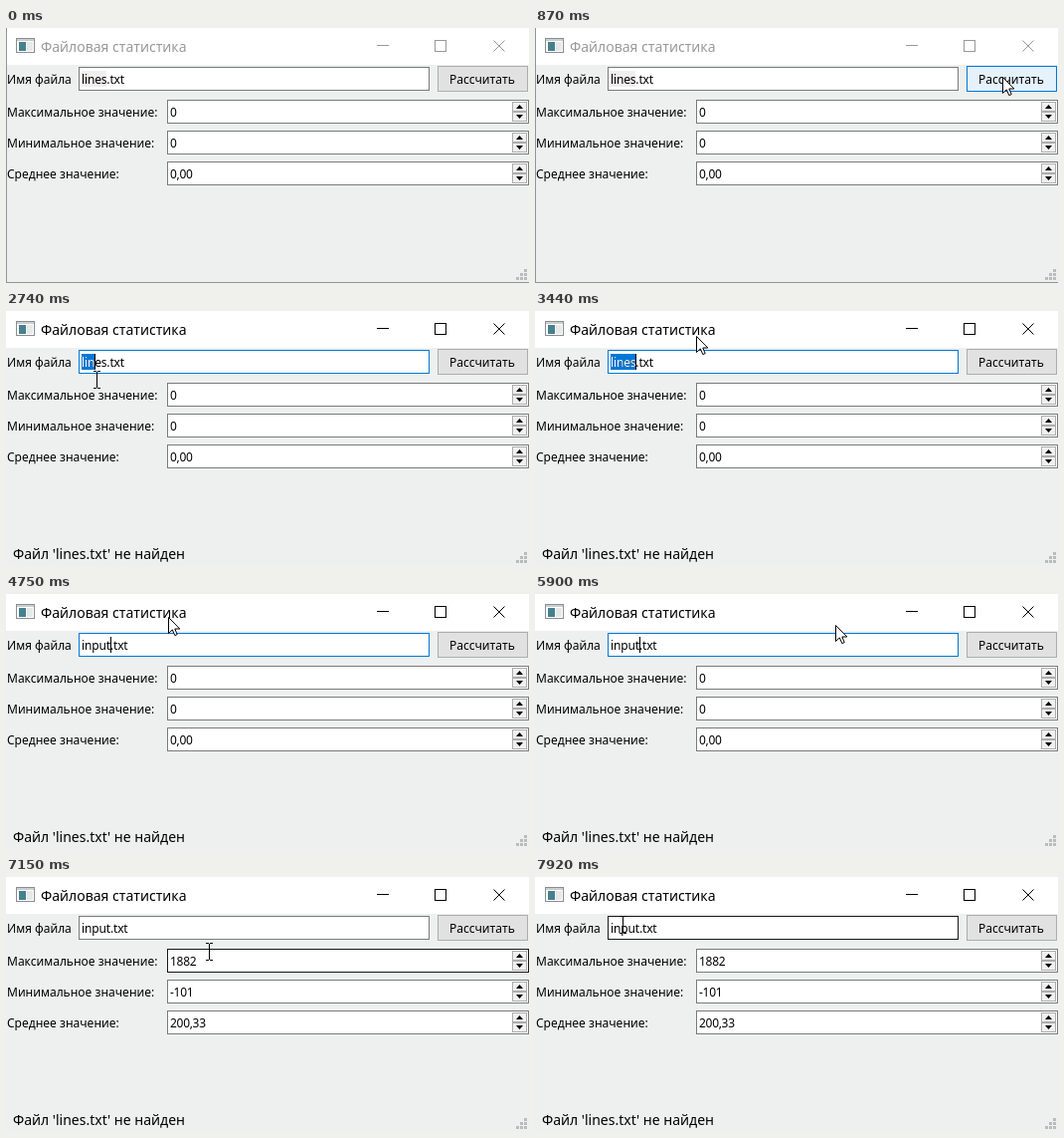
Recreate the animation shown at these times as an HTML page. Size 526 by 256 pixels, loop 8 s.

```html
<!DOCTYPE html>
<html lang="ru">
<head>
<meta charset="utf-8">
<title>Файловая статистика</title>
<style>
html, body { margin: 0; width: 100%; height: 100%; overflow: hidden; background: #eef0f0; }
svg { display: block; width: 526px; height: 256px; font: 12px "Noto Sans", "Open Sans", sans-serif; }
rect, .crisp { shape-rendering: crispEdges; }
text { white-space: pre; }
.big { font-size: 14px; }
.num { letter-spacing: -.3px; }
.name { letter-spacing: -.15px; }
</style>
</head>
<body>
<svg id="stage" viewBox="0 0 526 256"></svg>
<script>
const LOOP = 8000;
const stage = document.getElementById('stage');

function add(tag, attrs, text) {
  const el = document.createElementNS('http://www.w3.org/2000/svg', tag);
  set(el, attrs);
  if (text) el.textContent = text;
  return stage.appendChild(el);
}
function set(el, attrs) {
  for (const key in attrs) el.setAttribute(key, attrs[key]);
}
const show = (el, on) => set(el, { visibility: on ? 'visible' : 'hidden' });
const fill = (x, y, width, height, color) => add('rect', { x, y, width, height, fill: color });
const label = (x, y, text, cls = '') => add('text', { x, y, class: cls }, text);
const line = (d, stroke = '#000') => add('path', { d, stroke, fill: 'none', class: 'crisp' });

// Bordered box that knows whether a point is over it
function box(x, y, w, h, color = '#fff', stroke = '#7a7a7a') {
  const el = add('rect', { x: x + .5, y: y + .5, width: w - 1, height: h - 1, fill: color, stroke });
  const over = ([px, py]) => px >= x && px < x + w && py >= y && py < y + h;
  return { el, over };
}

// Window
fill(0, 0, 526, 256, '#eef0f0');
fill(0, 0, 526, 37, '#fff');
const edge = line('M.5 0V255.5H526', '#8f9599');

box(10, 10, 19, 15, '#fff', '#8b8f92');
fill(11, 11, 17, 2, '#c9cdd0');
fill(13, 14, 7, 9, '#47808f');
fill(21, 14, 6, 9, '#e6e9ea');

const title = label(35, 24, 'Файловая статистика', 'big');
const controls = [
  line('M373 17.5H385'),
  line('M431.5 12.5H442.5V23.5H431.5Z'),
  add('path', { d: 'M490.5 12.5L501.5 23.5M501.5 12.5L490.5 23.5' })
];

// File name row
const NAME_X = 76;
label(1, 56, 'Имя файла');
const edit = box(73, 39, 353, 24);
const selection = fill(NAME_X, 43, 0, 16, '#0078d7');
const name = label(NAME_X, 56, '', 'name');
const picked = label(NAME_X, 56, '', 'name');
set(picked, { fill: '#fff' });
const caret = fill(NAME_X, 43, 1, 16, '#000');
const button = box(434, 38, 91, 26, '#e1e1e1', '#adadad');
label(446, 56, 'Рассчитать');

// Result rows
const rows = [
  ['Максимальное значение:', '0', '1882'],
  ['Минимальное значение:', '0', '-101'],
  ['Среднее значение:', '0,00', '200,33']
].map(([text, before, after], i) => {
  const y = 72 + 31 * i;
  label(1, y + 17, text);
  const field = box(162, y, 364, 24);
  const value = label(165, y + 17, before, 'num');
  for (const dir of [-1, 1]) {
    const mid = y + 12 + 5 * dir;
    box(509, mid - 5, 15, 10, '#f0f0f0', '#adadad');
    add('path', { d: `M513 ${mid - 2 * dir}h7l-3.5 ${4 * dir}z` });
  }
  return { field, value, before, after };
});

const status = label(7, 249, "Файл 'lines.txt' не найден", 'big');
for (let r = 0; r < 3; r++)
  for (let c = 2 - r; c < 3; c++) fill(513 + 4 * c, 242 + 4 * r, 3, 3, '#b9bcbd');

// Pointers
const arrow = add('path', {
  d: 'M.5 .5V16.5L4.3 12.9L6.8 18.6L9.2 17.6L6.8 12H11.8Z', fill: '#fff', stroke: '#000'
});
const beam = line('M-3 -8.5H0M1 -8.5H4M.5 -8V8M-3 8.5H0M1 8.5H4');

// Each move glides on from where the last one stopped
const moves = [];
let at = { x: 430, y: 163 };
function glide(start, end, x, y, bow = 0) {
  moves.push({ start, end, from: at, to: { x, y }, bow });
  at = { x, y };
}
glide(100, 730, 470, 49);          // to the button
glide(1500, 1880, 111, 47);        // to the file name
glide(1970, 2440, 78, 58);
glide(2590, 2960, 104, 80);        // select the name
glide(3040, 3360, 162, 25);        // out of the way
glide(3440, 4980, 163.4, 22.8);    // slow drift while typing
glide(5440, 5520, 193, 20);
glide(5760, 6200, 470, 48);        // to the button
glide(6360, 6510, 466, 42);
glide(6610, 7530, 75, 47, 34);     // back to the file name
glide(7860, 7920, 88, 48);

const STEP = 75;
function pointer(t) {
  const { start, end, from, to, bow } = moves.filter(m => m.start <= t).pop() || moves[0];
  const step = time => Math.floor((time - start) / STEP + .2) + 1;
  const p = Math.max(0, Math.min(1, step(t) / step(end)));
  const u = p * p * (3 - 2 * p);
  const mix = (a, b) => a + (b - a) * u;
  return [mix(from.x, to.x), mix(from.y, to.y) + bow * Math.sin(Math.PI * u)].map(Math.round);
}

const within = (t, [a, b]) => t >= a && t < b;
const CLICKS = [[950, 1110], [6250, 6400]];
const DRAG = [2590, 3000];
const KEYS = [3820, 3900, 4450, 4520, 4670];
const BLINK = 530;

const nameWidth = n => n ? Math.round(name.getSubStringLength(0, n)) : 0;

function drawName(t, active, focus, dragging, x) {
  const typed = KEYS.filter(k => k <= t).length;
  const word = typed ? 'input'.slice(0, typed) : 'lines';
  name.textContent = word + '.txt';

  let count = 0;
  if (dragging) while (count < 5 && nameWidth(count + 1) <= x - NAME_X) count++;
  else if (!typed && (!active || t >= DRAG[1])) count = 5;

  set(selection, { width: nameWidth(count), fill: active ? '#0078d7' : '#f0efee' });
  picked.textContent = active ? word.slice(0, count) : '';
  set(caret, { x: NAME_X + nameWidth(dragging ? count : word.length) });
  const idle = t - KEYS[4] - 100;
  show(caret, focus && (idle < 0 || Math.floor(idle / BLINK) % 2 === 0));
}

function draw(t) {
  const pos = pointer(t);
  const [[press], [press2, release2]] = CLICKS;
  const visible = t >= 100;
  const active = t >= press;
  const focus = within(t, [DRAG[0], press2]);
  const dragging = within(t, DRAG);
  const over = b => visible && b.over(pos);

  const ink = active ? '#000' : '#999';
  set(title, { fill: ink });
  controls.forEach(c => set(c, { stroke: ink }));
  show(edge, !active);
  show(status, t >= CLICKS[0][1]);

  drawName(t, active, focus, dragging, pos[0]);
  set(edit.el, { stroke: focus ? '#0078d7' : over(edit) ? '#171717' : '#7a7a7a' });

  // Button colours: pressed, easing back, hovered, plain
  const look =
    CLICKS.some(c => within(t, c)) ? ['#cce4f7', '#005499'] :
    within(t, [release2, release2 + 200]) ? ['#daebf8', '#0066b8'] :
    over(button) ? ['#e5f1fb', '#0078d7'] : ['#e1e1e1', '#adadad'];
  set(button.el, { fill: look[0], stroke: look[1] });

  for (const { field, value, before, after } of rows) {
    set(field.el, { stroke: over(field) && !dragging ? '#171717' : '#7a7a7a' });
    value.textContent = t >= release2 ? after : before;
  }

  const onText = dragging || over(edit) || rows.some(r => over(r.field));
  for (const [el, on] of [[arrow, !onText], [beam, onText]]) {
    set(el, { transform: `translate(${pos})` });
    show(el, visible && on);
  }
}

const begin = performance.now();
function tick() {
  draw((performance.now() - begin) % LOOP);
  requestAnimationFrame(tick);
}
tick();
</script>
</body>
</html>
```
